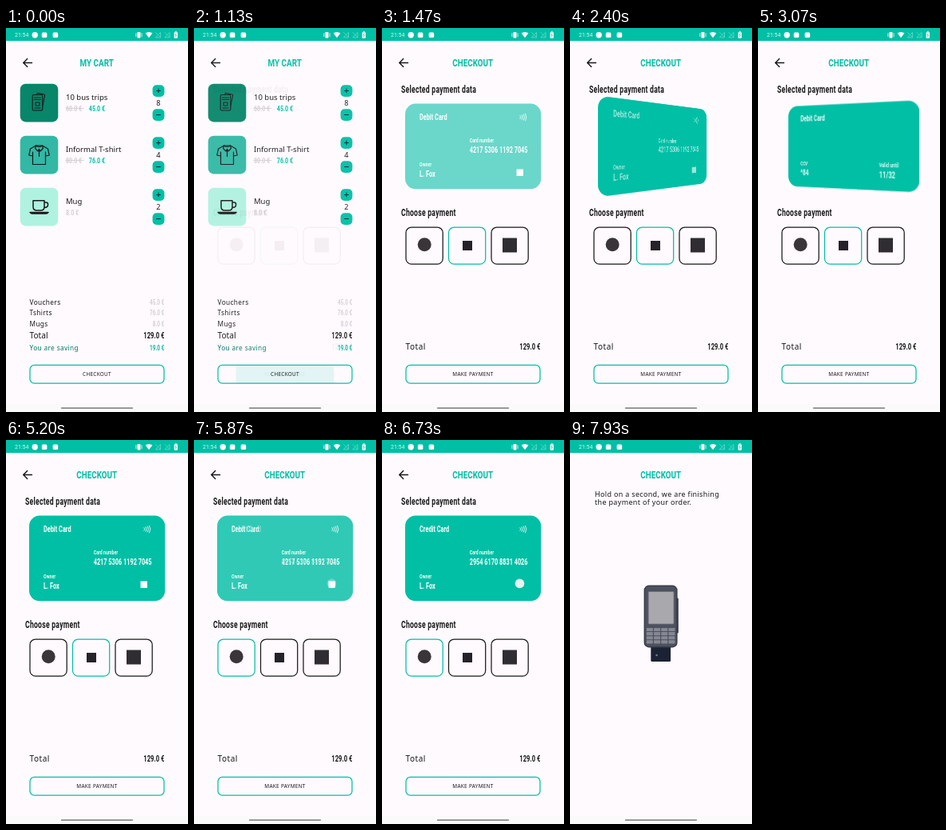
Recreate the animation shown at these times as an HTML page. Size 228 by 480 pixels, loop 8 s.

```html
<!DOCTYPE html>
<html lang="en">
<head>
<meta charset="utf-8">
<title>Cart checkout</title>
<style>
  html, body { margin: 0; width: 100%; height: 100%; overflow: hidden; background: #fffafe; }
  #stage { position: relative; width: 228px; height: 480px; overflow: hidden; }
  svg, #card { position: absolute; left: 0; top: 0; width: 228px; height: 480px; }
  #card { transform-origin: 114px 148px; }
  text { font-family: "Noto Sans", sans-serif; fill: #151515; }
  text.head { font-family: Roboto, sans-serif; font-weight: 700; }
</style>
</head>
<body>
<div id="stage">
  <svg id="base" viewBox="0 0 228 480"></svg>
  <div id="card">
    <svg id="debit" viewBox="0 0 228 480"></svg>
    <svg id="back" viewBox="0 0 228 480"></svg>
    <svg id="credit" viewBox="0 0 228 480"></svg>
  </div>
</div>
<script>
const LOOP = 8000, TEAL = '#00bfa5', INK = '#191919', PALE = '#d3cfd3', BG = '#fffafe';
const CONDENSE = 0.72;
const byId = id => document.getElementById(id);
const clamp = v => Math.max(0, Math.min(1, v));
const ramp = (t, from, to) => clamp((t - from) / (to - from));
const smooth = u => u * u * (3 - 2 * u);
const easeOut = u => 1 - (1 - u) ** 2;

// Markup helpers
const rect = (x, y, w, h, r, fill, extra = '') =>
  `<rect x="${x}" y="${y}" width="${w}" height="${h}" rx="${r}" fill="${fill}" ${extra}/>`;
const circle = (x, y, r, fill, extra = '') =>
  `<circle cx="${x}" cy="${y}" r="${r}" fill="${fill}" ${extra}/>`;
const line = (d, color = INK, width = 1.2, extra = '') =>
  `<path d="${d}" fill="none" stroke="${color}" stroke-width="${width}" stroke-linecap="round" stroke-linejoin="round" ${extra}/>`;
const label = (x, y, size, str, { gap = 0, anchor = 'start', color = INK, weight = 400 } = {}) =>
  `<text x="${x}" y="${y}" font-size="${size}" letter-spacing="${gap}" text-anchor="${anchor}" font-weight="${weight}" style="fill:${color}">${str}</text>`;
const head = (x, y, size, str, { color = INK, anchor = 'start', gap = 0 } = {}) =>
  `<text class="head" transform="translate(${x} ${y}) scale(${CONDENSE} 1)" font-size="${size}" letter-spacing="${gap}" text-anchor="${anchor}" style="fill:${color}">${str}</text>`;
const group = (id, body) => `<g id="${id}">${body}</g>`;

const title = str => head(113.7, 47.6, 13.7, str, { color: TEAL, anchor: 'middle' });
const price = (y, size, str, color = INK) => head(198.3, y, size, str, { color, anchor: 'end' });
const arrow = line('M32.5 43.5H22M26.7 38.5L21.7 43.5L26.7 48.5', INK, 1.4);

function button(id, str) {
  return `<clipPath id="${id}Clip">${rect(29.5, 421, 169, 23.5, 6, '#fff')}</clipPath>` +
    `<g clip-path="url(#${id}Clip)">${circle(114, 433, 0, TEAL, `id="${id}Ripple"`)}</g>` +
    rect(30, 421.4, 168, 22.8, 5.5, 'none', `stroke="${TEAL}" stroke-width="1.25"`) +
    label(114, 435.1, 6.4, str, { gap: 0.3, anchor: 'middle', weight: 500 });
}

function statusBar() {
  const signal = x => line(`M${x} 11.5L${x + 6} 5.5V11.5Z`, '#6fd8c9', 0.8) +
    line(`M${x} 5.5L${x + 6} 11.5`, '#6fd8c9', 0.7);
  return rect(0, 0, 228, 16.2, 0, TEAL) +
    `<text x="11" y="11.2" font-size="7" style="font-family:Roboto,sans-serif;fill:#d8f5f1">21:54</text>` +
    circle(36.2, 8.7, 3.7, '#fff') + rect(44.8, 5.4, 6.6, 6.6, 1.5, '#fff') + rect(58.6, 5.4, 6.6, 6.6, 1.5, '#fff') +
    rect(164.5, 5, 4, 7.5, 0.7, '#fff') + line('M162.9 6.7V10.7M170.1 6.7V10.7', '#fff', 0.8) +
    `<path d="M174.6 6.6Q179 3.4 183.4 6.6L179 12.2Z" fill="#fff"/>` +
    signal(187.5) + signal(199) +
    rect(210.6, 5.2, 4.4, 7.6, 0.8, '#fff') + rect(211.8, 4.2, 2, 1.2, 0.2, '#fff') +
    line('M213.2 6.8L212 9H213.6L212.4 11.2', TEAL, 0.7);
}

const ticketIcon = `<g transform="rotate(12 44 92)">${rect(37, 82.5, 10, 20, 1.2, '#07866a', `stroke="${INK}"`)}</g>` +
  rect(33.2, 83.5, 12.6, 19.5, 1.5, '#07866a', `stroke="${INK}" stroke-width="1.1"`) +
  line('M35.5 87H43.5M35.5 89.5H43.5M37 93H42V97H37ZM36 100H43', INK, 1.1);
const shirtIcon = line('M37.5 147L30.5 151L28.8 159L33.5 160V170.5H49.5V160L54.2 159L52.5 151L45.5 147Z') +
  line('M37.5 147L36.6 150.5L40 154L41.5 151.2L43 154L46.4 150.5L45.5 147M37.5 147Q41.5 150 45.5 147M41.5 152V160.5M33.5 160V155M49.5 160V155');
const cupIcon = line('M34 215.7H48V223.5Q48 228 43.5 228H38.5Q34 228 34 223.5ZM48 218H50.2Q52.6 218 52.6 220.5Q52.6 224.5 48 224.5M30 230.4H53Q52 232 50 232H33Q31 232 30 230.4Z', INK, 1.5);

function cartRow(i, name, tile, icon, count, full, now) {
  const y = i * 65;
  const step = (cy, d) => rect(183.6, cy - 7.3, 14.8, 14.8, 5, TEAL) + line(d, '#123', 1);
  return rect(17.7, 69.8 + y, 47.6, 47.6, 7, tile) + icon +
    label(75, 89.7 + y, 9.5, name) + head(75, 104 + y, 9.9, full, { color: PALE }) +
    (now ? line(`M75 ${100.4 + y}H97`, PALE, 1) + head(103.8, 104 + y, 9.9, now, { color: TEAL }) : '') +
    step(78.5 + y, `M188.6 ${78.5 + y}H193.4M191 ${76.1 + y}V${80.9 + y}`) +
    label(191, 96.8 + y, 9.2, count, { anchor: 'middle' }) +
    step(108.5 + y, `M188.6 ${108.5 + y}H193.4`);
}

function cartPage() {
  const sum = (y, name, cost, color, ink = INK) =>
    label(29.5, y, 8.3, name, { gap: 0.35, color: ink }) + price(y, 9, cost, color);
  return title('MY CART') + arrow +
    cartRow(0, '10 bus trips', '#07866a', ticketIcon, 8, '60.0 €', '45.0 €') +
    cartRow(1, 'Informal T-shirt', '#32b8a5', shirtIcon, 4, '80.0 €', '76.0 €') +
    cartRow(2, 'Mug', '#aff2e0', cupIcon, 2, '8.0 €', '') +
    sum(345.6, 'Vouchers', '45.0 €', PALE) + sum(359.1, 'Tshirts', '76.0 €', PALE) +
    sum(372.6, 'Mugs', '8.0 €', PALE) +
    label(29.5, 388, 10.2, 'Total') + price(388, 10.6, '129.0 €') +
    sum(402.6, 'You are saving', '19.0 €', TEAL, '#087b6c') + button('cartBtn', 'CHECKOUT');
}

function payPage() {
  const tile = (id, x) => rect(x, 249, 46.2, 46.2, 7, 'none', `id="${id}" stroke-width="1.25"`);
  const caption = (y, str) => head(24, y, 12, str, { gap: 0.35 });
  return title('CHECKOUT') + arrow +
    caption(81, 'Selected payment data') + caption(235, 'Choose payment') +
    `<clipPath id="tileClip">${rect(30, 249, 46.2, 46.2, 7, '#fff')}</clipPath>` +
    `<g clip-path="url(#tileClip)">${circle(53.2, 272, 0, TEAL, 'id="tileRipple"')}</g>` +
    tile('optA', 30) + tile('optB', 83.5) + tile('optC', 137) +
    circle(53.2, 270.8, 8.5, '#393539') + rect(101, 266, 12, 12, 0, '#252229') + rect(151, 262.5, 18, 18, 0, '#302d32') +
    label(29.5, 401.6, 10, 'Total', { gap: 0.55, weight: 500 }) + price(401.8, 10.6, '129.0 €') +
    button('payBtn', 'MAKE PAYMENT');
}

function waitPage() {
  let keys = '';
  for (let i = 0; i < 16; i++)
    keys += rect(95.8 + (i % 4) * 9.2, 235 + Math.floor(i / 4) * 5.1, 8.1, 4.1, 0.7, '#858892');
  return title('CHECKOUT') +
    label(31, 70.6, 9, 'Hold on a second, we are finishing', { gap: 0.32 }) +
    label(31, 80.6, 9, 'the payment of your order.', { gap: 0.32 }) +
    group('slip', rect(101.3, 239, 24.8, 38, 1.5, '#1b2236') + circle(108.6, 269, 1.3, '#737b8f')) +
    rect(131, 197.5, 4.8, 44, 1.3, '#343744') +
    rect(93.3, 182.3, 40.6, 76.4, 5.5, '#4d505e', 'stroke="#393c49" stroke-width="1.4"') +
    rect(98.2, 189.5, 31.8, 40.5, 1, '#a9a9ad', 'stroke="#70727c" stroke-width=".8"') + keys;
}

const plate = body => rect(29, 94.6, 170.2, 106.6, 13, TEAL) + `<g class="ink">${body}</g>`;
const cardHead = str => head(47, 115.4, 10.2, str, { color: '#fff' });
const field = (x, y, name, value) =>
  head(x, y, 7.3, name, { color: '#eafffb' }) + head(x, y + 12.2, 10.2, value, { color: '#fff' });
const waves = [0, 1, 2, 3].map(i =>
  line(`M${173 + i * 2.2} ${109.6 - i * 0.8}Q${175 + i * 2.4} 111.5 ${173 + i * 2.2} ${113.4 + i * 0.8}`, '#e4fffa', 0.9)).join('');
const front = (name, number, mark) => plate(cardHead(name) + waves +
  field(109.7, 143.4, 'Card number', number) + field(47, 173.4, 'Owner', 'L. Fox') + mark);

byId('base').innerHTML = rect(0, 0, 228, 480, 0, BG) +
  group('cart', cartPage()) + group('pay', payPage()) + group('wait', waitPage()) +
  statusBar() + rect(0, 470, 228, 10, 0, '#fafafa') + rect(68.8, 474.2, 90.4, 1.8, 0.9, '#8c8c8c');
byId('debit').innerHTML = front('Debit Card', '4217 5306 1192 7045', rect(168.5, 176.5, 8.5, 8.5, 0, '#fff'));
byId('credit').innerHTML = front('Credit Card', '2954 6170 8831 4026', circle(172.5, 179.4, 5.8, '#e6f3f0'));
byId('back').innerHTML = plate(cardHead('Debit Card') +
  field(47, 173.4, 'CCV', '*84') + field(152, 173.4, 'Valid until', '11/32'));

const inks = [...document.querySelectorAll('.ink')];
const card = byId('card');

function fade(id, a) {
  const el = byId(id);
  el.style.opacity = a;
  el.style.visibility = a > 0 ? 'visible' : 'hidden';
}

function ripple(id, t, start, reach) {
  const u = ramp(t, start, start + 420);
  const el = byId(id);
  el.setAttribute('r', u > 0 && u < 1 ? reach * easeOut(u) : 0);
  el.setAttribute('opacity', 0.2 * (1 - u));
}

const blend = (a, b, u) => `rgb(${a.map((v, i) => Math.round(v + (b[i] - v) * u))})`;

// Each flip turns the near edge from left to right, then eases flat.
function flip(t) {
  const second = t >= 4060;
  const start = second ? 4060 : 2270;
  const angle = 180 * easeOut(ramp(t, start, start + 1150));
  const turned = angle > 90;
  return { tilt: turned ? angle - 180 : angle, back: turned !== second };
}

function draw(t) {
  const toPay = smooth(ramp(t, 1090, 1380));
  const toWait = smooth(ramp(t, 7000, 7330));
  fade('cart', 1 - toPay);
  fade('pay', toPay * (1 - toWait));
  fade('wait', toWait);
  ripple('cartBtnRipple', t, 960, 95);
  ripple('payBtnRipple', t, 6840, 95);
  ripple('tileRipple', t, 5440, 34);

  const pick = ramp(t, 5460, 5680), teal = [0, 191, 165], ink = [25, 25, 25];
  byId('optA').setAttribute('stroke', blend(ink, teal, pick));
  byId('optB').setAttribute('stroke', blend(teal, ink, pick));
  byId('optC').setAttribute('stroke', INK);

  const { tilt, back } = flip(t);
  const swap = ramp(t, 5650, 6480);
  card.style.opacity = ramp(t, 1180, 1680) * (1 - toWait);
  card.style.transform = tilt ? `perspective(330px) rotateY(${tilt}deg)` : 'none';
  fade('debit', back ? 0 : 1 - swap);
  fade('back', back ? 1 : 0);
  fade('credit', swap);
  const shown = Math.cos(tilt * Math.PI / 180) ** 2;
  inks.forEach(el => { el.style.opacity = shown; });

  byId('slip').setAttribute('transform', `translate(0 ${24 * (1 - ramp(t, 7670, 7930))})`);
}

function tick() {
  draw(performance.now() % LOOP);
  requestAnimationFrame(tick);
}
tick();
</script>
</body>
</html>
```
